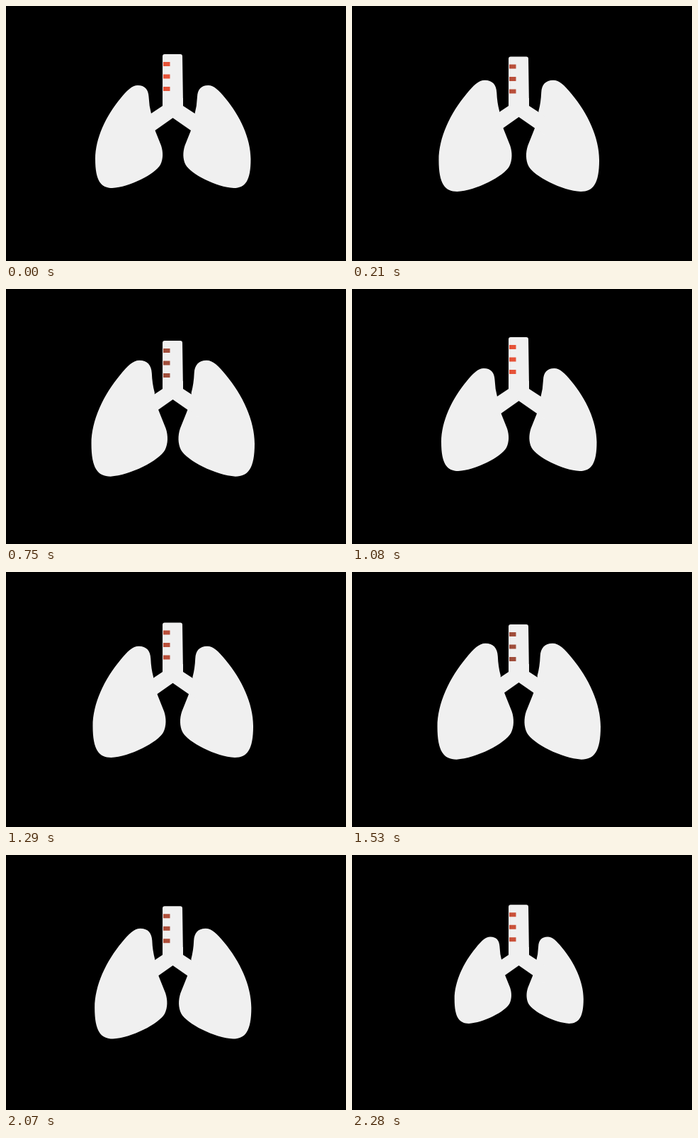
These frames come from a looping animation (480 by 360 pixels, 2310 ms). An HTML page:

```html
<!DOCTYPE html>
<html lang="en">
<head>
<meta charset="utf-8">
<title>Breathing lungs</title>
<style>
  html, body { margin: 0; width: 100%; height: 100%; overflow: hidden; background: #000; }
  svg { display: block; width: 100vw; height: 100vh; }
</style>
</head>
<body>
<svg viewBox="0 0 480 360" fill="#f0f0f0">
  <defs>
    <path id="lung" d="M186 112C196 112 201 118 201.5 128Q202 141 205 152V161L211 177L219 197
      C222 206 222 216 218 224C211 237 174 256 150 257C134 257 126 247 126 216
      C126 187 141 155 162 130C171 119 178 112 186 112Z"/>
  </defs>
  <use class="lung" href="#lung"/>
  <g transform="matrix(-1 0 0 1 471.5 0)"><use class="lung" href="#lung"/></g>
  <path id="bronchi"/>
  <g id="trachea">
    <path d="M224 68H246Q249 68 249 71L250 138H221V71Q221 68 224 68Z"/>
    <path id="stripes" d="M222 79h9.500v6h-9.500zM222 96.500h9.500v6h-9.500zM222 114h9.500v6h-9.500z"/>
  </g>
  <path d="M221 130H250V146H221Z"/>
</svg>
<script>
const LOOP = 2310, STEP = 30;
const HALF = 540;            // one breath in or out
const LAST = 3 * HALF;       // start of the slow last breath out
const SHRINK = 2020;         // lungs start to collapse
const $ = id => document.getElementById(id);
const lungs = document.querySelectorAll('.lung');

const mix = (a, b, k) => `rgb(${a.map((v, i) => Math.round(v + (b[i] - v) * k))})`;

function draw(now) {
  const t = Math.floor(now % LOOP / STEP) * STEP;
  const breath = t < LAST ? 1 - Math.abs(1 - t % (2 * HALF) / HALF) : 1 - (t - LAST) / 870;
  const fill = Math.min(1, 1.65 * breath);
  const open = t < LAST ? fill : 1;

  const spread = 1 - open;
  const size = 1 + .13 * open - .0011 * Math.max(0, t - SHRINK);
  for (const lung of lungs) {
    lung.setAttribute('transform',
      `translate(${216 - 5.5 * spread} ${159 + 4.5 * spread}) scale(${size}) translate(-210.5 -163.5)`);
  }

  const notch = 156 + 2 * spread;
  $('bronchi').setAttribute('d',
    `M221 141L200 155V${notch + 25}L235.5 ${notch}L271.5 ${notch + 25}V155L250 141Z`);
  $('trachea').setAttribute('transform', `translate(0 ${6.2 * Math.sin(breath * Math.PI / 2)})`);
  $('stripes').setAttribute('fill', mix([230, 83, 56], [90, 72, 62], fill / 2));
  requestAnimationFrame(draw);
}
requestAnimationFrame(draw);
</script>
</body>
</html>
```
